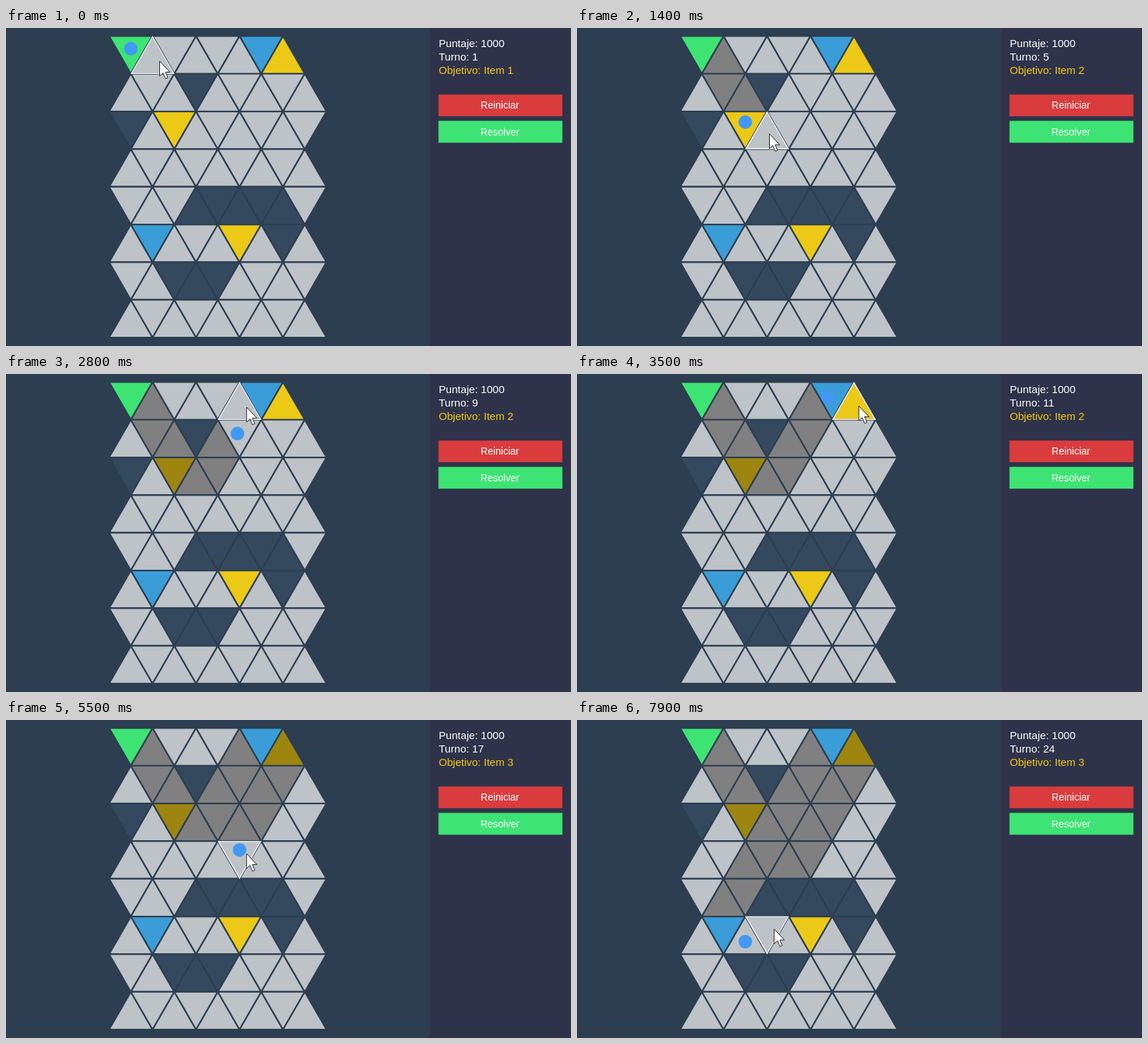
An HTML page that plays this animation: 800 by 450 pixels, repeating every 8000 ms.

```html
<!DOCTYPE html>
<html lang="es">
<head>
<meta charset="utf-8">
<title>Laberinto de triángulos</title>
<style>
html, body { margin: 0; width: 100%; height: 100%; overflow: hidden; background: #2c3e50; }
svg { display: block; width: 800px; height: 450px; }
text { font: 15.1px "Liberation Sans", Arial, sans-serif; fill: #fff; }
.button { font-size: 14px; text-anchor: middle; }
.tile { stroke: #2c3e50; stroke-width: 2.2; }
</style>
</head>
<body>
<svg id="stage" viewBox="0 0 800 450">
  <rect width="800" height="450" fill="#2c3e50"/>
  <rect x="600" width="200" height="450" fill="#2f3349"/>
  <g id="board"></g>
  <polygon id="hover" fill="none" stroke="#fff" stroke-width="1.5"/>
  <circle id="player" r="9.6" fill="#4199f3"/>
  <text x="612.7" y="27">Puntaje: 1000</text>
  <text x="612.7" y="45.8" id="turn"></text>
  <text x="612.7" y="64.6" id="goal" style="fill:#f3c918"></text>
  <rect x="612.4" y="94.2" width="175.4" height="30.6" fill="#da3c3e"/>
  <rect x="612.4" y="131.4" width="175.4" height="30.9" fill="#3de473"/>
  <text class="button" x="699.3" y="114.3">Reiniciar</text>
  <text class="button" x="699.3" y="151.7">Resolver</text>
  <path id="cursor" d="M0 0V21L4.8 16.6L8.3 24.8L11.5 23.3L8.2 15.4H14.5Z"
        fill="#fff" stroke="#222" stroke-width="1"/>
</svg>
<script>
const LOOP = 8000, STEP = 100;
const HALF = 30.78, HEIGHT = 53.33, LEFT = 146, TOP = 11.4;
const ROWS = 8, COLS = 9;
const HOVER_SCALE = 0.97;

const COLORS = {
  plain: '#bdc3c7', wall: '#34495e', start: '#3de473', bonus: '#3a9dd8',
  item: '#ecc916', used: '#808080', usedItem: '#9d8510'
};
// Cells are named by row and column digits.
const KINDS = {
  start: '00', bonus: '06 51', item: '07 22 55',
  wall: '13 20 43 44 45 46 47 57 62 63 64'
};
const WALK = 'RDRDRRURURRDLDLDLLLDLDRR';
const TURNS = { R: [0, 1], L: [0, -1], D: [1, 0], U: [-1, 0] };

// Pace: [time, moves made, tiles reached by the mouse].
const PACE = [[0, 0.3, 1], [1400, 4.74, 4.35], [2200, 7.08, 7], [3500, 10.64, 10.4],
  [5500, 16.68, 16], [6800, 20.33, 20], [7900, 23.9, 24]];

const $ = id => document.getElementById(id);
const mix = (a, b, p) => a + (b - a) * p;
const smooth = p => p * p * (3 - 2 * p);
const pointsDown = (r, c) => (r + c) % 2 === 0;

function kindOf(id) {
  return Object.keys(KINDS).find(k => KINDS[k].split(' ').includes(id)) || 'plain';
}

function corners(r, c) {
  const x = LEFT + c * HALF, y = TOP + r * HEIGHT;
  const [base, tip] = pointsDown(r, c) ? [y, y + HEIGHT] : [y + HEIGHT, y];
  return [[x, base], [x + 2 * HALF, base], [x + HALF, tip]];
}

function center([r, c]) {
  const pts = corners(r, c);
  return [0, 1].map(i => (pts[0][i] + pts[1][i] + pts[2][i]) / 3);
}

const path = [[0, 0]];
for (const step of WALK) {
  const [r, c] = path[path.length - 1], [dr, dc] = TURNS[step];
  path.push([r + dr, c + dc]);
}
const pathIds = path.map(cell => cell.join(''));

const tiles = {};
for (let r = 0; r < ROWS; r++) {
  for (let c = 0; c < COLS; c++) {
    const id = '' + r + c;
    if (id === '08') continue;
    const el = document.createElementNS('http://www.w3.org/2000/svg', 'polygon');
    const pts = corners(r, c), mid = center([r, c]);
    el.setAttribute('points', pts.join(' '));
    el.setAttribute('class', 'tile');
    $('board').append(el);
    const outline = pts.map(pt => pt.map((v, i) => mix(mid[i], v, HOVER_SCALE))).join(' ');
    tiles[id] = { el, outline, kind: kindOf(id), order: pathIds.indexOf(id) };
  }
}

function paceAt(t) {
  const i = Math.max(1, PACE.findIndex(k => k[0] >= t));
  const a = PACE[i - 1], b = PACE[i];
  const p = (t - a[0]) / (b[0] - a[0]);
  return [mix(a[1], b[1], p), mix(a[2], b[2], p)];
}

// Travels from one path cell to the next, then rests for the remaining share.
function along(place, speed, ease) {
  const i = Math.floor(place);
  const from = center(path[i]), to = center(path[Math.min(i + 1, path.length - 1)]);
  const p = ease(Math.min(1, (place - i) * speed));
  return [mix(from[0], to[0], p), mix(from[1], to[1], p)];
}

function tileAt(x, y) {
  const r = Math.floor((y - TOP) / HEIGHT);
  const depth = (y - TOP) / HEIGHT - r;
  for (let c = 0; c < COLS; c++) {
    const reach = HALF * (pointsDown(r, c) ? 1 - depth : depth);
    if (Math.abs(x - LEFT - (c + 1) * HALF) <= reach) return tiles['' + r + c];
  }
}

function fillOf(tile, turn) {
  const used = tile.order >= 0 && tile.order < turn;
  if (used && tile.kind === 'plain') return COLORS.used;
  if (used && tile.kind === 'item') return COLORS.usedItem;
  return COLORS[tile.kind];
}

function draw(t) {
  const [moves, reached] = paceAt(t);
  const turn = Math.floor(moves);
  for (const tile of Object.values(tiles)) tile.el.setAttribute('fill', fillOf(tile, turn));

  const dot = turn ? along(moves - 1, 1.25, p => p) : center(path[0]);
  $('player').setAttribute('cx', dot[0]);
  $('player').setAttribute('cy', dot[1]);

  const aim = along(reached, 2, smooth);
  const x = aim[0] + 10, y = aim[1];
  const over = tileAt(x, y);
  $('hover').setAttribute('points', over && over.kind !== 'wall' ? over.outline : '');
  $('cursor').setAttribute('transform', `translate(${x} ${y})`);

  const found = pathIds.slice(0, turn + 1).filter(id => tiles[id].kind === 'item').length;
  $('turn').textContent = 'Turno: ' + (turn + 1);
  $('goal').textContent = 'Objetivo: Item ' + (found + 1);
}

const began = performance.now();
function tick() {
  const t = (performance.now() - began) % LOOP;
  draw(Math.floor(t / STEP) * STEP);
  requestAnimationFrame(tick);
}
tick();
</script>
</body>
</html>
```
